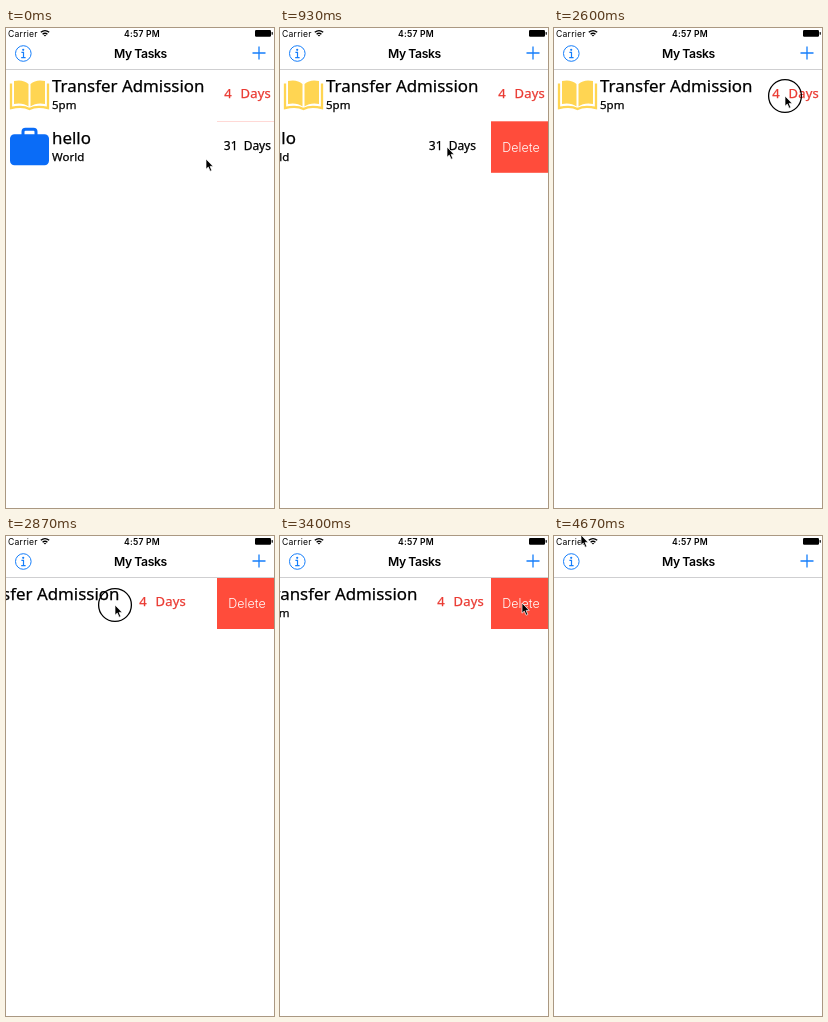
An HTML page that plays this animation: 268x480 px, repeating every 4740 ms.

```html
<!DOCTYPE html>
<html lang="en">
<head>
<meta charset="utf-8">
<title>My Tasks</title>
<style>
  html, body { margin: 0; width: 100%; height: 100%; overflow: hidden; background: #fff; }
  svg { display: block; width: 268px; height: 480px; }
  text { font-family: Inter, Roboto, sans-serif; }
  .status { font-size: 8.58px; letter-spacing: .25px; }
  .clock { font-weight: 600; }
  .heading { font-size: 12.2px; font-weight: 600; letter-spacing: -.4px; }
  .blue { fill: none; stroke: #157efb; }
  .delete { fill: #fff; font-size: 12.5px; font-weight: 300; }
  .hand text { font-family: "Noto Sans", "Open Sans", sans-serif; stroke: currentColor; stroke-width: .25px; fill: currentColor; }
  .hand .name { font-size: 16.9px; }
  .hand .note { font-size: 11.5px; }
  .hand .days { font-size: 12px; word-spacing: 3px; text-anchor: end; }
  .hand .soon { font-size: 13px; word-spacing: 5px; letter-spacing: .2px; color: #ea3a32; }
  .middle { text-anchor: middle; }
</style>
</head>
<body>
<svg viewBox="0 0 268 480">
  <defs>
    <g id="button">
      <rect x="211" width="57" height="51.5" fill="#ff4c3b"/>
      <text class="delete middle" x="241" y="30.5">Delete</text>
    </g>
  </defs>

  <g id="row1" transform="translate(0 41.5)">
    <use href="#button"/>
    <g class="hand slide">
      <rect width="268" height="52" fill="#fff"/>
      <g fill="#ffd552">
        <path d="M8 11.5Q17 9.5 22.5 14.5V37Q17 33 8 34.5Z"/>
        <path d="M39 11.5Q30 9.5 24.5 14.5V37Q30 33 39 34.5Z"/>
        <path d="M5 14V38.5Q17 36 23.5 39.5Q30 36 42 38.5V14" fill="none" stroke="#ffd552" stroke-width="2.3"/>
      </g>
      <text class="name" x="46" y="22.5">Transfer Admission</text>
      <text class="note" x="46" y="39.5">5pm</text>
      <text class="days soon" x="265" y="28.5">4 Days</text>
    </g>
  </g>

  <g id="row2" transform="translate(0 93.3)">
    <use href="#button"/>
    <g class="hand slide">
      <rect width="268" height="52" fill="#fff"/>
      <rect x="4" y="13" width="39" height="31" rx="4.5" fill="#0a6cf7"/>
      <path d="M17 14V10.5Q17 8 19.5 8H27.5Q30 8 30 10.5V14" fill="none" stroke="#0a6cf7" stroke-width="3"/>
      <text class="name" x="46" y="22.5">hello</text>
      <text class="note" x="46" y="39.5">World</text>
      <text class="days" x="265" y="28.5">31 Days</text>
    </g>
  </g>

  <text class="status" x="2" y="8.5">Carrier</text>
  <g fill="none" stroke="#000" stroke-width="1.4">
    <path d="M34.8 4.3Q39 .9 43.2 4.3M36.6 6.2Q39 4.2 41.4 6.2"/>
    <path d="M37.6 7L39 8.6 40.4 7Z" fill="#000" stroke="none"/>
  </g>
  <text class="status clock middle" x="136" y="8.5">4:57 PM</text>
  <rect x="249" y="2" width="16" height="6.8" rx="1.2"/>
  <rect x="265.6" y="4" width="1.2" height="2.8" rx=".6"/>

  <circle class="blue" cx="17.3" cy="25.5" r="7.8"/>
  <circle cx="17.2" cy="21.8" r="1.1" fill="#157efb"/>
  <path class="blue" d="M15.4 24.3H17.5V29.5M15.2 29.6H19.6" stroke-width="1.2"/>
  <text class="heading middle" x="134.4" y="30">My Tasks</text>
  <path class="blue" d="M246.5 25H259.5M253 18.5V31.5" stroke-width="1.3"/>
  <path d="M0 41.5H268" stroke="#cfcfd1"/>

  <g id="pointer">
    <circle id="press" r="16.4" fill="none" stroke="#000" stroke-width="1.3"/>
    <path d="M0 0V10.2L2.3 8.1 4.1 12.2 5.8 11.5 4.1 7.4H7.2Z" stroke="#fff" stroke-width=".7"/>
  </g>
</svg>
<script>
  const LOOP = 4740, FPS = 15, LAST = 70;
  const $ = s => document.querySelector(s);

  // Each key is [step, values...], at 15 steps per second.
  const pointerKeys = [
    [0, 200, 131], [2, 200, 131], [9, 95, 132], [11, 100, 130], [14, 167, 119],
    [18, 228, 119], [22, 238, 120], [29, 238, 120], [34, 236, 105], [38, 231, 68],
    [39, 231, 68], [43, 109, 69], [46, 118, 69], [51, 242, 67], [66, 242, 67], [70, 27, -1]
  ];
  const presses = [[2, 12], [24, 28], [38, 45], [53, 56]];
  const rows = [
    { el: $('#row1'), fade: 56, slide: [[39, 0], [40, -57], [43, -85], [45, -85], [48, -66], [51, -61]] },
    { el: $('#row2'), fade: 28, slide: [[2, 0], [7, -60], [9, -84], [12, -82], [14, -69], [18, -61]] }
  ];

  function at(keys, n) {
    if (n <= keys[0][0]) return keys[0].slice(1);
    const i = keys.findIndex(k => k[0] > n);
    if (i < 0) return keys[keys.length - 1].slice(1);
    const a = keys[i - 1], b = keys[i], p = (n - a[0]) / (b[0] - a[0]);
    return a.slice(1).map((v, j) => v + (b[j + 1] - v) * p);
  }

  function draw(ms) {
    const n = Math.min(LAST, Math.floor((ms % LOOP + 4) * FPS / 1000));
    $('#pointer').setAttribute('transform', `translate(${at(pointerKeys, n)})`);
    $('#press').setAttribute('opacity', presses.some(([a, b]) => n >= a && n < b) ? 1 : 0);
    for (const { el, fade, slide } of rows) {
      el.querySelector('.slide').setAttribute('transform', `translate(${at(slide, n)[0]} 0)`);
      el.setAttribute('opacity', at([[fade, 1], [fade + 2, 0]], n)[0]);
    }
  }

  const start = performance.now();
  function tick() {
    draw(performance.now() - start);
    requestAnimationFrame(tick);
  }
  tick();
</script>
</body>
</html>
```
